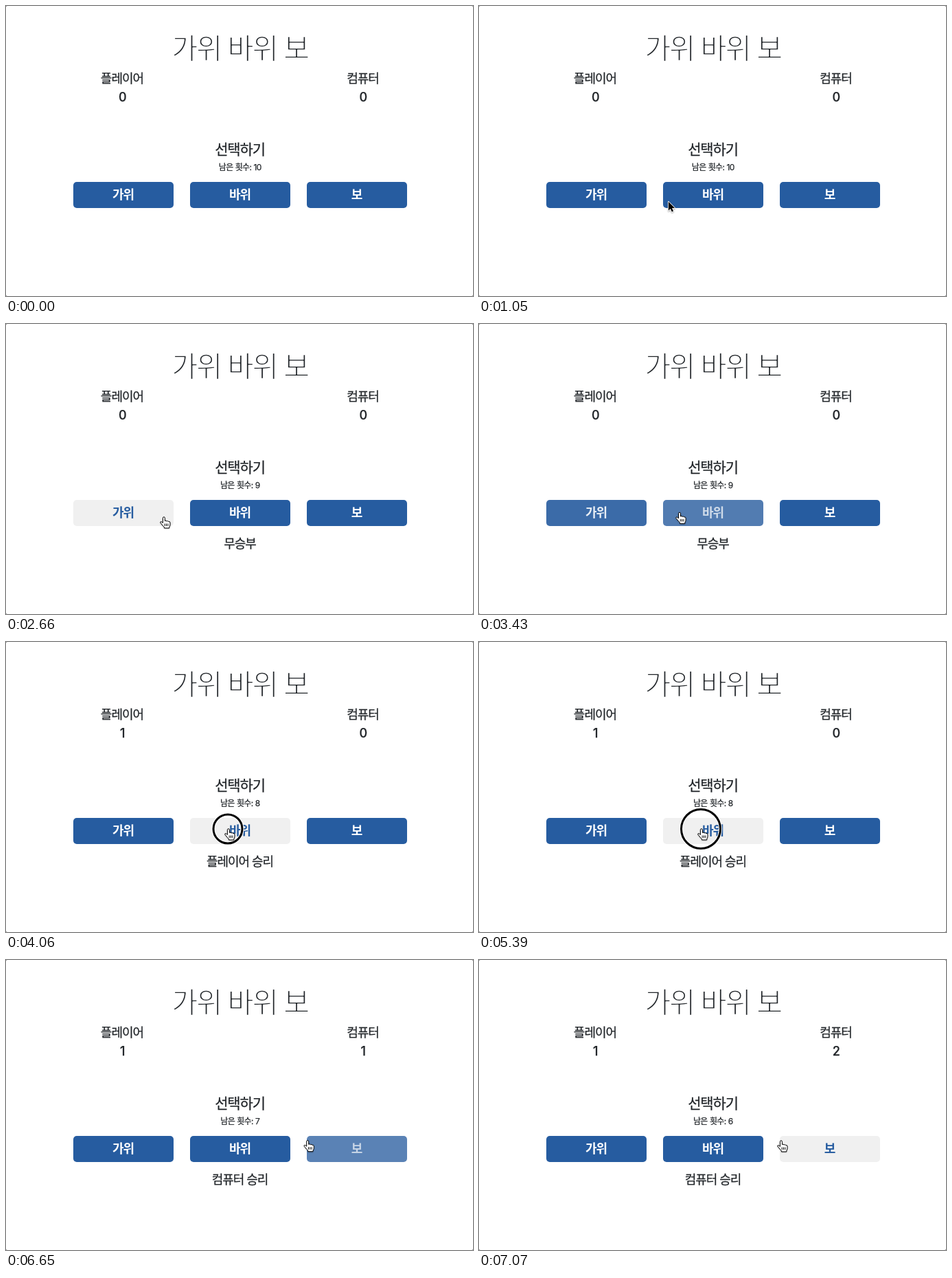
Write an HTML page with a canvas that moves like this. It is 680x422 px and loops after 8000 ms.

```html
<!DOCTYPE html>
<html lang="ko">
<head>
<meta charset="utf-8">
<title>가위 바위 보</title>
<style>
  html, body { margin: 0; width: 100%; height: 100%; overflow: hidden; background: #fff; }
  canvas { display: block; }
</style>
</head>
<body>
<canvas id="stage" width="680" height="422"></canvas>
<script>
const ctx = document.getElementById('stage').getContext('2d');
const LOOP = 8000, STEP = 70, FADE = 150;
const FAMILY = 'Inter, "Noto Sans CJK KR", "Noto Sans CJK", sans-serif';
const INK = '#212529', BLUE = [38, 92, 160], PALE = [240, 240, 240], WHITE = [255, 255, 255];
const WIN = '플레이어 승리', LOSS = '컴퓨터 승리', DRAW = '무승부';

const clamp = v => Math.min(1, Math.max(0, v));
const smooth = v => v * v * (3 - 2 * v);
const easeOut = v => 1 - (1 - v) ** 3;
const mix = (a, b, k) => `rgb(${a.map((v, i) => Math.round(v + (b[i] - v) * k))})`;

const buttons = [
  { label: '가위', enter: 2405, leave: 3310 },
  { label: '바위', enter: 3385, leave: 6365 },
  { label: '보', enter: 6600, leave: Infinity },
];

// curved pointer moves: each runs from a point past a control point to an end
const moves = [
  { start: 630, end: 1365, from: [328, 395], via: [295, 252], to: [229, 281], ease: smooth },
  { start: 3150, end: 3610, from: [229, 281], via: [276, 275], to: [323, 272], ease: smooth },
  { start: 6020, end: 6790, from: [323, 272], via: [380, 240], to: [439, 263], ease: easeOut },
];

const focusClick = 1470;
const clicks = [
  { at: 2450, result: DRAW },
  { at: 3990, result: WIN },
  { at: 5390, result: LOSS },
  { at: 6930, result: LOSS },
];

const arrow = new Path2D('M0 0V13L2.9 10.2L5 14.8L7.2 13.8L5.2 9.3H9.2Z');
const hand = new Path2D('M.4 2.4Q.4 .8 1.9 .8T3.4 2.4V6.6Q5 5.4 6.2 7Q7.8 6 8.8 7.6' +
  'Q10.8 7 11 9V12Q10.8 14.2 9.8 15.4V17H2.4V15.5Q0 13.5 -1.6 11Q-4.2 8.8 -3 7.8Q-1.8 7 .4 9.4Z');
const creases = new Path2D('M3.2 10.5V14M5.5 10.5V14M7.8 10.5V14');

// grow thickens the strokes of the type, or thins them when negative
function text(str, x, y, size, { weight = 500, color = INK, grow = 0.25 } = {}) {
  ctx.font = `${weight} ${size}px ${FAMILY}`;
  ctx.letterSpacing = `${-0.055 * size}px`;
  ctx.lineJoin = 'round';
  ctx.fillStyle = color;
  ctx.fillText(str, x, y);
  if (!grow) return;
  ctx.lineWidth = Math.abs(grow);
  ctx.strokeStyle = grow > 0 ? color : '#fff';
  ctx.strokeText(str, x, y);
}

function drawButton(b, i, t) {
  const x = 98 + 170 * i;
  const k = smooth(clamp((t - b.enter) / FADE)) - smooth(clamp((t - b.leave) / FADE));
  ctx.fillStyle = mix(BLUE, PALE, k);
  ctx.beginPath();
  ctx.roundRect(x, 256, 146, 38, 5);
  ctx.fill();
  text(b.label, x + 72.5, 280.7, 18, { weight: 700, color: mix(WHITE, BLUE, k), grow: 0 });
}

function pointerAt(t) {
  const m = moves.filter(m => m.start <= t).pop();
  const k = m.ease(clamp((t - m.start) / (m.end - m.start)));
  return m.from.map((a, i) =>
    (1 - k) ** 2 * a + 2 * k * (1 - k) * m.via[i] + k * k * m.to[i]);
}

function ringRadius(t) {
  const within = (from, steps = 1) => t >= from && t < from + STEP * steps;
  if (within(focusClick) || clicks.some(c => within(c.at + STEP))) return 21;
  return clicks.some(c => within(c.at)) ? 28.5 : 0;
}

function drawRing(x, y, r) {
  ctx.beginPath();
  ctx.arc(x, y, r, 0, Math.PI * 2);
  for (const [width, color] of [[5, '#fff'], [3, '#000']]) {
    ctx.lineWidth = width;
    ctx.strokeStyle = color;
    ctx.stroke();
  }
}

function drawPointer(x, y, isHand) {
  ctx.save();
  ctx.translate(x, y);
  ctx.lineJoin = 'round';
  ctx.shadowColor = 'rgba(0,0,0,.35)';
  ctx.shadowBlur = 2;
  ctx.shadowOffsetY = 1;
  if (isHand) {
    ctx.translate(-1, -1);
    ctx.fillStyle = '#fff';
    ctx.fill(hand);
    ctx.shadowColor = 'transparent';
    ctx.lineWidth = 1;
    ctx.strokeStyle = '#000';
    ctx.stroke(hand);
    ctx.stroke(creases);
  } else {
    ctx.lineWidth = 1.8;
    ctx.strokeStyle = '#fff';
    ctx.stroke(arrow);
    ctx.shadowColor = 'transparent';
    ctx.fillStyle = '#000';
    ctx.fill(arrow);
  }
  ctx.restore();
}

function drawBoard(t) {
  const played = clicks.filter(c => t >= c.at + STEP).map(c => c.result);
  const count = result => played.filter(r => r === result).length;

  text('가위 바위 보', 340.5, 76.8, 41.6, { weight: 200, grow: -1.7 });
  text('플레이어', 169, 112, 18);
  text(count(WIN), 169.3, 139, 18);
  text('컴퓨터', 519.5, 112, 18);
  text(count(LOSS), 519.8, 139, 18);
  text('선택하기', 340.5, 216, 21);
  ctx.wordSpacing = '0.5px';
  text(`남은 횟수: ${10 - played.length}`, 340.7, 238.7, 12, { weight: 400 });
  ctx.wordSpacing = '0px';
  text(played.at(-1) ?? '', 340.5, 326, 18);
}

function draw(t) {
  ctx.fillStyle = '#777';
  ctx.fillRect(0, 0, 680, 422);
  ctx.fillStyle = '#fff';
  ctx.beginPath();
  ctx.roundRect(0, 0, 680, 422, 2);
  ctx.fill();

  ctx.textAlign = 'center';
  drawBoard(t);
  buttons.forEach((b, i) => drawButton(b, i, t));

  if (t < moves[0].start) return;
  const [x, y] = pointerAt(t);
  const r = ringRadius(t);
  if (r) drawRing(x, y, r);
  drawPointer(x, y, buttons.some(b => t >= b.enter && t < b.leave));
}

function tick() {
  const t = performance.now() % LOOP;
  draw(Math.floor(t / STEP) * STEP);
  requestAnimationFrame(tick);
}
tick();
</script>
</body>
</html>
```
